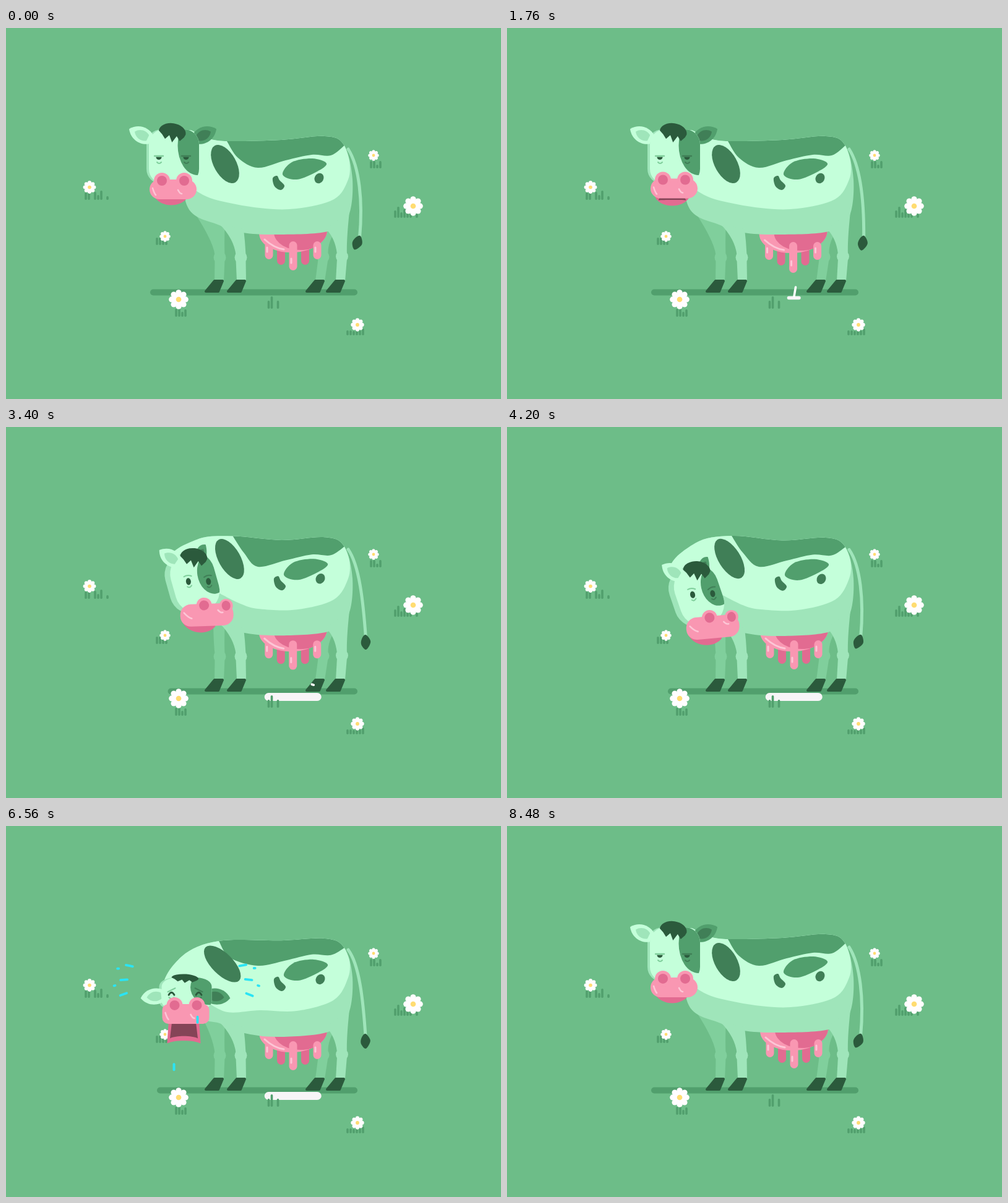
These frames come from a looping animation (800x600 px, 8520 ms). An HTML page with a canvas:

```html
<!DOCTYPE html>
<html lang="en">
<head>
<meta charset="utf-8">
<title>Sad cow</title>
<style>
html, body { margin: 0; width: 100%; height: 100%; overflow: hidden; background: #6dbd88; }
canvas { display: block; width: 800px; height: 600px; }
</style>
</head>
<body>
<canvas id="stage" width="800" height="600"></canvas>
<script>
const c = document.getElementById('stage').getContext('2d');
const LOOP = 8520, TAU = Math.PI * 2;
const BG = '#6dbd88', GRASS = '#519f6d', LIGHT = '#c4ffda', MID = '#9fe5ba', FAR = '#80cf9c',
  DARK = '#407f57', DEEP = '#2b5a3c', PINK = '#f997b2', ROSE = '#e26b91', SHINE = '#fdc6d6',
  WINE = '#854457', MILK = '#f7f5f7', TEAR = '#2ae4f5';

// Blends numbers, arrays and objects alike.
function mix(a, b, k) {
  if (typeof a === 'number') return a + (b - a) * k;
  if (Array.isArray(a)) return a.map((v, i) => mix(v, b[i], k));
  return Object.fromEntries(Object.keys(a).map(key => [key, mix(a[key], b[key], k)]));
}
const ease = u => u * u * (3 - 2 * u);
const ramp = (t, from, to) => ease(Math.min(1, Math.max(0, (t - from) / (to - from))));
const pulse = (t, a, b, d, e) => ramp(t, a, b) - ramp(t, d, e);

function track(t, keys) {
  const i = keys.findIndex(key => key[0] > t);
  if (i < 0) return keys[keys.length - 1][1];
  const [[t0, a], [t1, b]] = [keys[i - 1], keys[i]];
  return mix(a, b, ramp(t, t0, t1));
}

function fill(color, path) {
  c.fillStyle = color;
  c.fill(path);
}
function at(x, y, rot, draw) {
  c.save();
  c.translate(x, y);
  c.rotate(rot);
  draw();
  c.restore();
}
function within(path, draw) {
  c.save();
  c.clip(path);
  draw();
  c.restore();
}
// Smooth line through points, closed in a loop or by straight edges through `rest`.
function spline(pts, rest) {
  const path = new Path2D(), n = pts.length;
  const get = i => rest ? pts[Math.max(0, Math.min(n - 1, i))] : pts[(i + n) % n];
  path.moveTo(...pts[0]);
  for (let i = 0; i < (rest ? n - 1 : n); i++) {
    const [a, b, d, e] = [get(i - 1), get(i), get(i + 1), get(i + 2)];
    path.bezierCurveTo(b[0] + (d[0] - a[0]) / 6, b[1] + (d[1] - a[1]) / 6,
      d[0] - (e[0] - b[0]) / 6, d[1] - (e[1] - b[1]) / 6, ...d);
  }
  for (const p of rest || []) path.lineTo(...p);
  path.closePath();
  return path;
}
function slab(x, y, w, h, r) {
  const path = new Path2D();
  path.roundRect(x - w / 2, y - h / 2, w, h, r);
  return path;
}
function oval(color, x, y, rx, ry = rx, rot = 0) {
  const path = new Path2D();
  path.ellipse(x, y, rx, ry, rot, 0, TAU);
  fill(color, path);
}
function line(color, w, x1, y1, x2, y2, bend = 0) {
  c.strokeStyle = color;
  c.lineWidth = w;
  c.beginPath();
  c.moveTo(x1, y1);
  c.quadraticCurveTo((x1 + x2) / 2, (y1 + y2) / 2 + bend, x2, y2);
  c.stroke();
}
const bar = (color, x, y, w, h) => fill(color, slab(x + w / 2, y + h / 2, w, h, Math.min(w, h) / 2));

const CALM = { turn: 0, x: 0, y: 0, tilt: 0, squash: 1, ear: [0, .45], floor: 233, sag: 0,
  nape: [290, 172], neck: [322, 178], withers: [357, 183], chest: [300, 259] };
const LOOK = { ...CALM, turn: 1, ear: [0, .75], floor: 266, sag: 1,
  nape: [270, 170], neck: [322, 165], withers: [377, 178], chest: [338, 262] };
const DOWN = { ...LOOK, x: 12, y: 67, tilt: -.21, floor: 260, sag: 4,
  nape: [264, 235], neck: [304, 188], withers: [363, 176], chest: [345, 270] };
const SNIFF = { ...CALM, x: 20.5, y: 71, squash: .79, ear: [8, .16], floor: 244, sag: 5,
  nape: [256, 245], neck: [289, 201], withers: [357, 180], chest: [322, 268] };
const CRY = { ...SNIFF, y: 85, squash: .46, ear: [19, -.12], sag: 7,
  nape: [255, 265], neck: [284, 211], withers: [344, 186], chest: [322, 283] };
const POSES = [[0, CALM], [2440, CALM], [2880, LOOK], [2940, LOOK], [3120, { ...LOOK, y: -15 }], [3540, DOWN],
  [4520, DOWN], [4960, SNIFF], [5480, SNIFF], [5720, CRY], [7080, CRY], [7500, { ...CALM, y: -12 }], [7780, CALM]];

function flower(x, y, r) {
  for (let i = 0; i < 8; i++) {
    const a = i * TAU / 8;
    oval('#fffdff', x + Math.cos(a) * r * .7, y + Math.sin(a) * r * .7, r * .29);
  }
  oval('#fffdff', x, y, r * .6);
  oval('#ffdc72', x, y, r * .27);
}
// Blades stand five pixels apart; a zero leaves a gap.
function tuft(x, bottom, heights) {
  heights.forEach((h, i) => h && bar(GRASS, x + i * 5 - 1.8, bottom - h, 3.6, h));
}
function plants() {
  tuft(129, 278, [12, 12, 0, 13, 8, 15, 0, 6]);
  tuft(244, 351, [12, 12, 8, 6]);
  tuft(275, 467, [13, 13, 8, 12]);
  tuft(590, 227, [12, 12, 6, 12]);
  tuft(629, 307, [12, 18, 9, 14, 9, 7, 0, 7]);
  tuft(552, 497, [8, 8, 7, 8, 8, 11]);
  tuft(424.5, 454, [13, 20, 0, 13]);
  flower(135, 257.5, 10.5);
  flower(257, 337, 8.8);
  flower(279, 439, 16);
  flower(594, 206, 8.8);
  flower(658, 288, 16);
  flower(568, 480, 10.8);
}

function puddle(t) {
  const r = track(t, [[0, 0], [1690, 0], [1760, 11], [2920, 34], [3340, 46], [7100, 46], [8080, 0], [LOOP, 0]]);
  const h = Math.min(13, r * .5);
  if (r > .5) bar(MILK, 463.7 - r, 436.5 - h / 2, r * 2, h);
}
function milk(t) {
  const step = 420;
  for (let i = 0; i < 4; i++) {
    const age = t - 1580 - i * step, y = 394 + 135 * (age / step) ** 2;
    if (age > 0 && y < 433) line('#fff', 3.6, 464 + (y - 398) * .12, y, 464, Math.min(y + 15, 434));
    const a = age - 230;
    if (a > 0 && a < 430) {
      const x = 464 + (i % 2 ? 1 : -1) * .096 * a, sy = 437 - .25 * a + .00057 * a * a;
      line('#fff', 3.6, x - 1.5, sy - .5, x + 1.5, sy + .5);
    }
  }
}

function tail(t, sag) {
  const sway = -Math.cos(t * TAU * 6 / LOOP);
  const whip = 1.5 * pulse(t, 2600, 2800, 2800, 3260);
  const [x, y] = mix([577 + sway * 5.5, 339], [602, 302], whip);
  const [mx, my] = mix([577, 250], [579, 242], whip);
  c.strokeStyle = MID;
  c.lineWidth = 5;
  c.beginPath();
  c.moveTo(553, 196 + sag * .6);
  c.bezierCurveTo(mix(571, 566, whip), 224, mx, my + 30, x, y);
  c.stroke();
  at(x, y, mix(.2 - .24 * sway, -.44, whip), () => fill(DEEP, spline([[0, -3], [8, 8], [1, 21], [-7, 13], [-6, 3]])));
}

// A thigh that narrows to the knee, a shin and a slanted hoof.
function leg(color, left, ly, right, ry, kx, ky, foot) {
  const thigh = new Path2D();
  thigh.moveTo(left, ly);
  thigh.quadraticCurveTo(kx - 11, ky - 30, kx - 8, ky - 4);
  thigh.lineTo(kx + 8, ky - 4);
  thigh.quadraticCurveTo(kx + 7, ky - 25, right, ry);
  fill(color, thigh);
  oval(color, kx, ky, 10);
  fill(color, spline([[kx - 8, ky + 4]], [[foot, 409], [foot + 15, 409], [kx + 8, ky + 4]]));
  const hoof = spline([[foot, 409]], [[foot + 13, 409], [foot + 6, 426], [foot - 14, 426]]);
  c.lineWidth = 4;
  c.strokeStyle = DEEP;
  fill(DEEP, hoof);
  c.stroke(hoof);
}

function udder(t, cry) {
  const busy = pulse(t, 1200, 1700, 3100, 3500);
  at(busy * (Math.sin(t / 67) * .6 - 2), cry * 3 + busy, 0, () => {
    const teats = odd => {
      for (let i = odd; i < 5; i += 2) {
        const x = 425 + 19.5 * i, end = 392 - Math.abs(i - 2) * 9 + (i === 2 ? busy * 3 : 0);
        bar(odd ? ROSE : PINK, x - 6.5, 345, 13, end - 345);
        if (!odd) line(SHINE, 3, x - 3, end - 19, x - 3, end - 12);
      }
    };
    teats(1);
    const bag = new Path2D();
    bag.ellipse(464, 330, 55, 33, -.06, 0, TAU);
    fill(PINK, bag);
    within(bag, () => oval(ROSE, 479, 329, 46, 30, -.06));
    teats(0);
    line(SHINE, 3, 418, 342, 449, 358, 6);
  });
}

function body(t, pose, cry) {
  const { sag, withers: [wx, wy], chest: [lx, ly] } = pose;
  const low = 334 + sag, qx = lx - 8, qy = ly + 27;

  leg(FAR, qx, qy - 6, 354, 310, 345.5, 371, 337);
  leg(FAR, 518, 325, 535, 325, 512.5, 370, 500);
  udder(t, cry);

  const trunk = spline([pose.nape, pose.neck, [wx, wy], [445, 181 + sag * .6], [515, 175 + sag], [546, 189 + sag],
    [560, 245], [553, 305], [520, 329 + sag * .6], [440, low], [383, 331 + sag * .5], [345, 319], [qx, qy]]);
  fill(MID, trunk);
  leg(MID, 345, 317, 384, 325, 379.5, 371, 373);
  leg(MID, 517, 325, 555, 297, 543, 369.5, 533);

  within(trunk, () => {
    const side = [[lx, ly], [lx + 36, ly + 18], [410, 291 + sag], [470, 292 + sag], [530, 277 + sag * .6], [553, 245], [555, 215], [547, 188]];
    fill(LIGHT, spline(side, [[547, 120], [200, 120], [200, ly]]));
    const saddle = [[wx, wy], [wx + 18, wy + 27], [407, 226], [452, 214 + sag * .5], [494, 205 + sag * .4], [525, 206 + sag * .4], [547, 190 + sag]];
    fill(GRASS, spline(saddle, [[547, 120], [wx, 120]]));
  });
  oval(DARK, wx - 3 - (wx - 357) * .4 + sag * .5, wy + 37, 34 + sag * .6, 18 - sag * .1, 1.06 + (wx - 357) * .008 - sag * .025);
  at(Math.min(2, sag * 2), sag * .7, 0, () => {
    fill(GRASS, spline([[447, 237], [462, 217], [495, 211], [518, 219], [503, 232], [470, 245]]));
    fill(DARK, spline([[431, 243], [438, 239], [442, 246], [450, 255], [444, 262], [434, 256]]));
    oval(DARK, 506, 243, 7.2, 8.5, .5);
  });
}

function eye(t, x, y, side, lid) {
  if (t > 2520 && t < 4640) {
    const sad = ramp(t, 3300, 3540);
    oval(DEEP, x, y, 4, 5.6);
    line(lid, 2, x - 6, y - 8 - sad * (1 - side), x + 6, y - 8 - sad * (1 + side), -3);
    line(lid, 2, x - 3, y + 8, x + 4, y + 7, 4);
  } else if (t > 4800 && t < 7320) {
    const slant = side * mix(3, -3, ramp(t, 5500, 5760));
    line(DEEP, 2.8, x - 4.5, y + 2, x + 4.5, y + 2, -8);
    line(lid, 2, x - 6, y - 6 + slant, x + 6, y - 6 - slant);
    line(lid, 2, x - 4, y + 6, x + 4, y + 6, 4);
  } else {
    within(slab(x, y + 3, 14, 9, 0), () => oval(DEEP, x, y - 1.5, 4.6));
    line(lid, 2.4, x - 7, y - 3, x + 7, y - 3);
    line(lid, 2, x - 3, y + 7, x + 4, y + 7, 4);
  }
}

function ear(x, y, rot, flip, outer, core) {
  at(x, y, 0, () => {
    c.scale(flip, 1);
    c.rotate(rot);
    for (const [color, s] of [[outer, 1], [core, .6]]) {
      const leaf = new Path2D();
      leaf.moveTo(-20 * s, 0);
      leaf.bezierCurveTo(-10 * s, -15 * s, 8 * s, -16 * s, 19 * s, -8 * s);
      leaf.lineTo(19 * s, 8 * s);
      leaf.bezierCurveTo(8 * s, 16 * s, -10 * s, 15 * s, -20 * s, 0);
      fill(color, leaf);
      c.translate(2, 0);
    }
  });
}

// A cup with slightly flared sides; bow pushes its bottom edge down or up.
function cup(color, x, top, w, bottom, bow) {
  const path = new Path2D();
  path.moveTo(x - w / 2 + 3, top);
  path.lineTo(x - w / 2, bottom);
  path.bezierCurveTo(x - w / 3.4, bottom + bow, x + w / 3.4, bottom + bow, x + w / 2, bottom);
  path.lineTo(x + w / 2 - 3, top);
  fill(color, path);
}

function muzzle(k, stern, open) {
  const [mx, my, jx, jt] = mix([270, 261, 267, 0], [301, 260, 289, .3], k);
  at(jx, 262, jt, () => {
    const edge = mix(11, 22, stern) + 25 * open;
    cup(ROSE, 0, 0, 54, edge, mix(18, 3, stern) - 9 * open);
    if (open > .02) cup(WINE, 0, 13, 45, mix(14.5, 39, open), -5 * open);
  });
  at(mx, my, k * .12, () => fill(PINK, slab(0, 0, mix(76, 86, k), mix(32, 36, k), mix(mix(16, 10, stern), 17, k))));
  for (const [a, b] of [[[252, 247, 13, 8], [299, 244, 12.5, 8]], [[288, 247, 13, 8], [334, 250, 11, 7]]]) {
    const [x, y, lobe, hole] = mix(a, b, k);
    oval(PINK, x, y, lobe);
    oval(ROSE, x, y, hole, 8);
  }
  line(SHINE, 2.6, mix(237, 265, k), mix(259, 251, k), mix(242, 276, k), mix(270, 262, k), 3);
  line(SHINE, 2.6, mix(278, 320, k), mix(262, 255, k), mix(284, 327, k), mix(268, 260, k), 3);
}

function head(t, pose, cry) {
  const { turn: k, squash, ear: [drop, flap] } = pose;
  const calm = t < 2400 || t > 7700;
  const chew = calm ? Math.sin(Math.PI * t / 704) ** 2 : 0;
  const open = Math.max(cry * (.97 + .03 * Math.sin(t / 60)), chew * .14);
  const press = (s, draw) => at(0, 155 * (1 - s), 0, () => { c.scale(1, s); draw(); });

  at(295 + pose.x, 165 + pose.y, pose.tilt, () => {
    c.translate(-295, -165);
    ear(mix(322, 308, k), mix(172, 161, k) + drop, flap, -mix(1, .6, k), GRASS, DARK);
    press(squash * .75 + .25, () => {
      const [x, y, w, h, r, rot] = mix([271.5, 208, 81, 88, 24, 0], [290, 205, 72, 98, 34, -.12], k);
      const face = slab(0, 0, w, h, r);
      at(x - mix(4, 9, k), y, rot, () => fill(MID, face));
      at(x, y, rot, () => {
        fill(LIGHT, face);
        within(face, () => oval(GRASS, mix(38, 32, k), mix(-18, -7, k), mix(32, 25, k), mix(48, 34, k), -rot));
      });
    });
    ear(mix(217, 256, k), mix(172, 158, k) + drop, flap, 1, LIGHT, MID);
    press(squash, () => at(mix(269, 295, k), mix(167, 163, k), mix(.15, .27, k), () => {
      const hair = new Path2D();
      hair.ellipse(0, 2, 22, 15, 0, Math.PI, 0);
      for (let i = 0; i < 7; i++) hair.lineTo(20 - i * 6, i % 2 ? 18 - Math.abs(i - 3) * 2 : 7);
      fill(DEEP, hair);
    }));
    at(0, (squash - 1) * 44, 0, () => {
      eye(t, mix(247, 280, k), mix(210, 202, k), -1, FAR);
      eye(t, mix(291, 312, k), mix(210, 207, k), 1, DARK);
    });
    at(0, (squash - 1) * 78 - chew * 1.5, 0, () => muzzle(k, Math.min(1, (1 - squash) * 4), open));
  });
}

function tears(t) {
  const sob = 410;
  // Each sob throws a mirrored fan of dashes and dots.
  for (let n = 0; n < 4; n++) for (const side of [-1, 1]) for (let i = 0; i < 5; i++) {
    const u = (t - 5436 - n * sob - i * 10 - (side < 0 ? 20 : 0)) / 400;
    if (u <= 0 || u >= 1) continue;
    const dot = i % 2, angle = .62 - i * .15, reach = (dot ? 108 : 92) * (1 - (1 - u) ** 2);
    const x = 290 + side * (22 + Math.cos(angle) * reach), y = 270 - Math.sin(angle) * reach + 10 * u * u;
    const len = (dot ? 1 : 5.5) * Math.min(1, u * 8, (1 - u) * 5), dir = angle - u * .6;
    const dx = side * Math.cos(dir) * len, dy = -Math.sin(dir) * len;
    line(TEAR, 3.8, x - dx, y - dy, x + dx, y + dy);
  }
  if (t > 5340 && t < 5700) line(TEAR, 4, 271, 308, 271, 308 + 6 * ramp(t, 5340, 5460));
  for (let i = 0; i < 3; i++) {
    const a = t - 6022 - i * sob, x = 271.5 + 38 * (i % 2), y = 304 + .00028 * a * a;
    if (a > 0 && y < 428) line(TEAR, 4, x, y, x, y + 9);
  }
}

const start = performance.now();
function frame() {
  const t = (performance.now() - start) % LOOP;
  const pose = track(t, POSES);
  const cry = pulse(t, 5540, 5760, 7000, 7240);
  c.lineCap = c.lineJoin = 'round';
  c.fillStyle = BG;
  c.fillRect(0, 0, 800, 600);
  bar(GRASS, pose.floor, 422.5, 568 - pose.floor, 10);
  puddle(t);
  plants();
  tail(t, pose.sag);
  body(t, pose, cry);
  milk(t);
  head(t, pose, cry);
  tears(t);
  requestAnimationFrame(frame);
}
frame();
</script>
</body>
</html>
```
